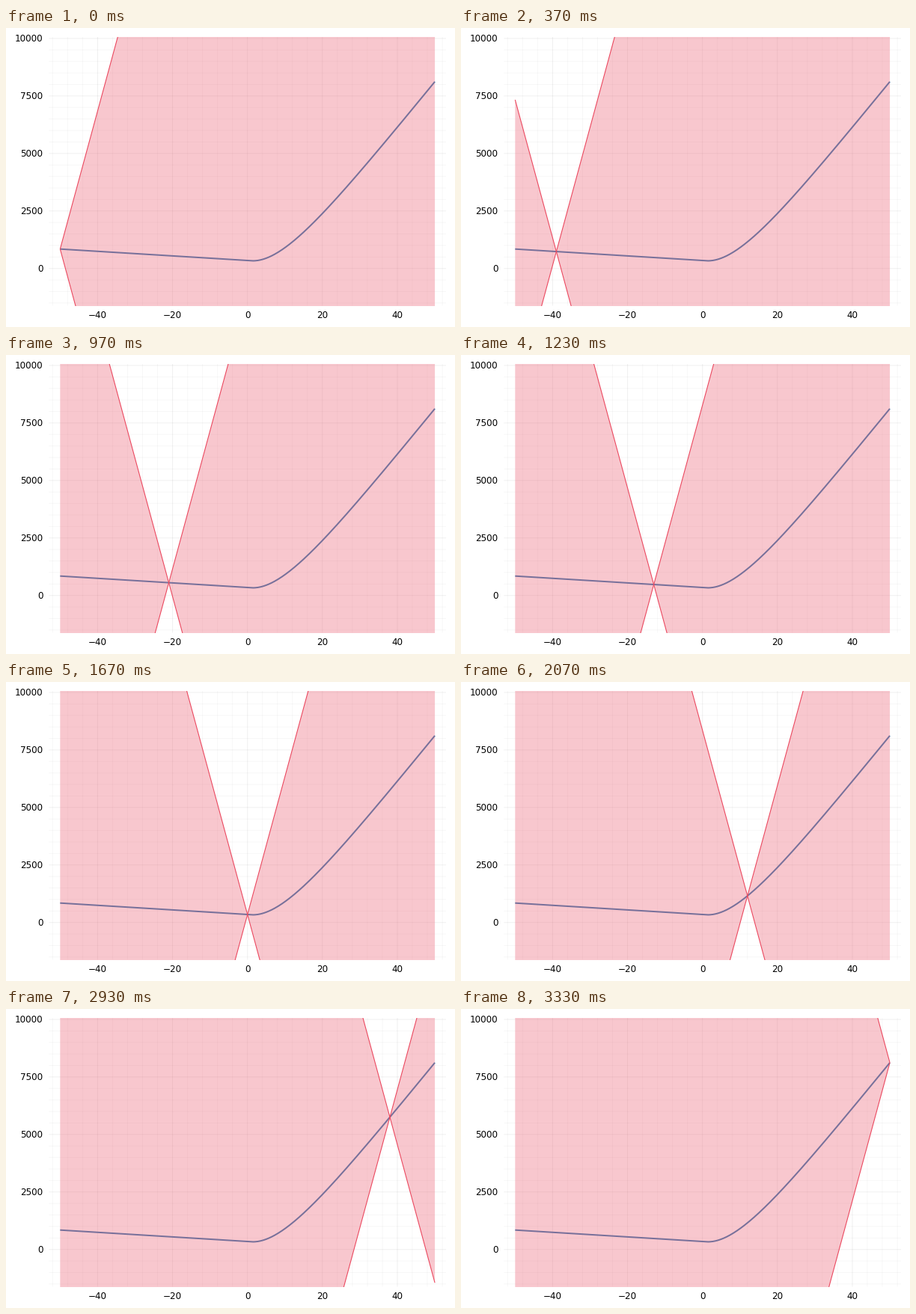
A matplotlib script that plays this animation: 600x400 px, repeating every 3360 ms.

```python
import numpy as np
import matplotlib.pyplot as plt
from matplotlib.animation import FuncAnimation
from matplotlib.collections import LineCollection
from matplotlib.patches import Polygon

W, H, DPI = 600, 400, 100
PX = 72 / DPI                       # points per pixel
LEFT, RIGHT, TOP, BOTTOM = 57.3, 588.1, 11.8, 371.5
X0, XS = 322.7, 5.0075              # pixel of x = 0, pixels per unit
Y0, YS = 321.7, 0.03077
SLOPE = 600
ROSE = (235 / 255, 72 / 255, 95 / 255)


def curve(x):
    """Straight descent that bends smoothly into a steep climb after x = 1."""
    t = np.maximum(x - 1, 0)
    tau = 9.65
    return 345 - 10 * x + 210 * (t - tau * (1 - np.exp(-t / tau)))


plt.rcParams["font.family"] = "DejaVu Sans"
fig = plt.figure(figsize=(W / DPI, H / DPI), dpi=DPI, facecolor="white")
ax = fig.add_axes([LEFT / W, 1 - BOTTOM / H, (RIGHT - LEFT) / W, (BOTTOM - TOP) / H])
ax.axis("off")
xlim = ((LEFT - X0) / XS, (RIGHT - X0) / XS)
ylim = ((Y0 - BOTTOM) / YS, (Y0 - TOP) / YS)


def add_grid(xs, ys, alpha):
    lines = [[(x, ylim[0]), (x, ylim[1])] for x in xs]
    lines += [[(xlim[0], y), (xlim[1], y)] for y in ys]
    ax.add_collection(LineCollection(lines, colors=[(0, 0, 0, alpha)],
                                     linewidths=PX, snap=False, zorder=0))


x_ticks = range(-40, 41, 20)
y_ticks = range(0, 10001, 2500)
add_grid([x for x in range(-52, 53, 4) if x % 20],
         [y for y in range(-1500, 10001, 500) if y % 2500], 0.03)
add_grid(x_ticks, y_ticks, 0.06)

for x in x_ticks:
    fig.text((X0 + XS * x) / W, 1 - 388 / H, str(x).replace("-", "\u2212"),
             size=12 * PX, ha="center", va="baseline")
for y in y_ticks:
    fig.text(49.5 / W, 1 - (Y0 - YS * y + 4.4) / H, str(y),
             size=12 * PX, ha="right", va="baseline")

xs = np.linspace(-50, 50, 401)
ax.plot(xs, curve(xs), color="steelblue", lw=2 * PX, solid_capstyle="butt", zorder=2)
cone = ax.add_patch(Polygon(np.zeros((6, 2)), facecolor=ROSE, alpha=0.3,
                            linewidth=0, zorder=3))
rising, = ax.plot([], [], color=ROSE, lw=1.1 * PX, solid_capstyle="butt", zorder=4)
falling, = ax.plot([], [], color=ROSE, lw=1.1 * PX, solid_capstyle="butt", zorder=4)
ax.set_xlim(xlim)
ax.set_ylim(ylim)


def update(tick):
    # 30 positions per second, on a clock of 10 ms ticks
    x = -50 + (6 * tick + 3) // 20
    y = curve(x)
    dl, dr = SLOPE * (x + 50), SLOPE * (50 - x)
    cone.set_xy([(-50, y + dl), (x, y), (50, y + dr),
                 (50, y - dr), (x, y), (-50, y - dl)])
    rising.set_data([-50, 50], [y - dl, y + dr])
    falling.set_data([-50, 50], [y + dl, y - dr])
    return cone, rising, falling


anim = FuncAnimation(fig, update, frames=336, interval=10, repeat=True,
                     repeat_delay=0, blit=False)
plt.show()
```
